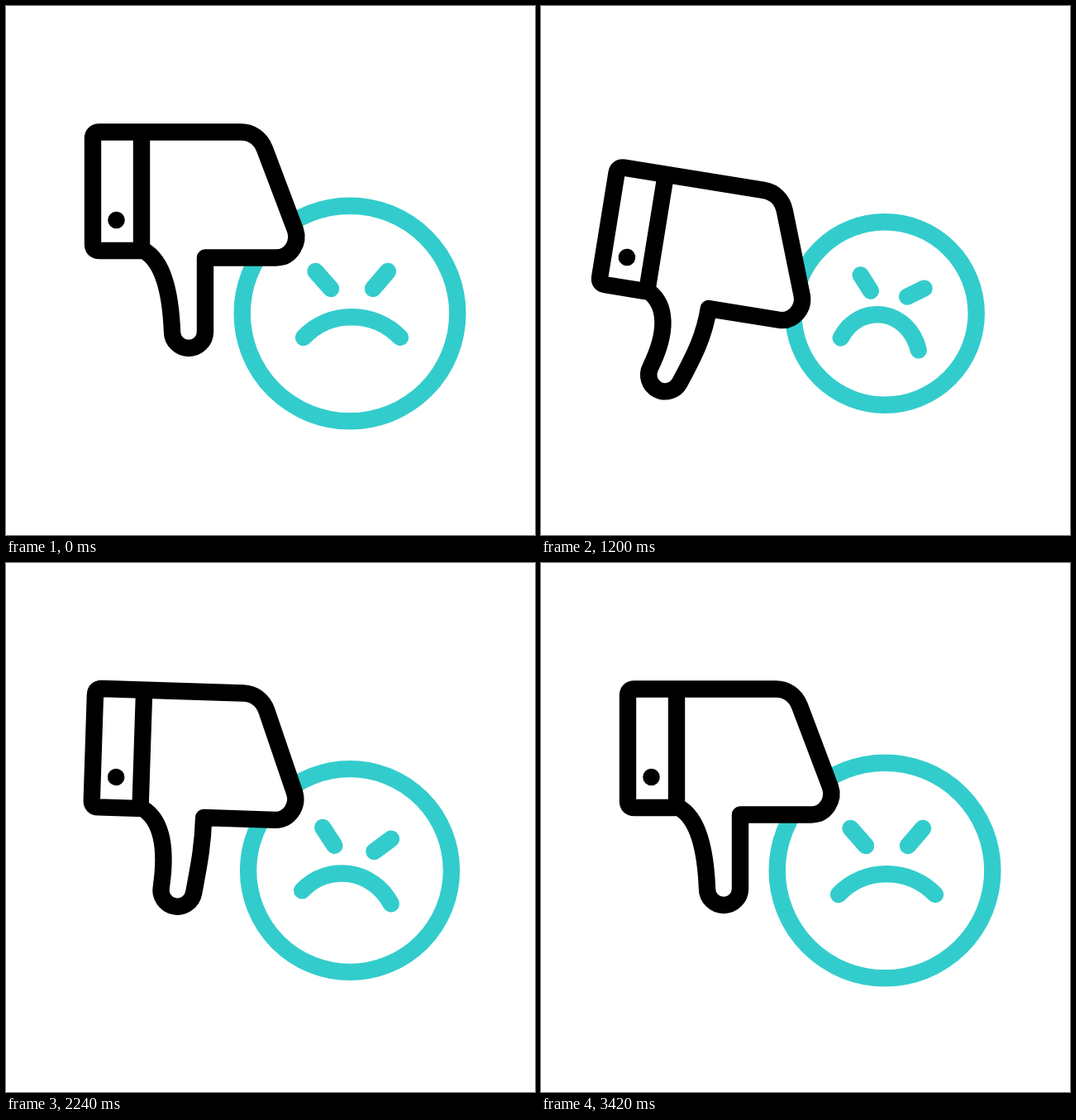
Recreate the animation shown at these times as an HTML page with a canvas. Size 640 by 640 pixels, loop 3.6 s.

```html
<!DOCTYPE html>
<html lang="en">
<head>
<meta charset="utf-8">
<title>Thumbs down</title>
<style>
  html, body { margin: 0; width: 100%; height: 100%; overflow: hidden; background: #fff; }
  canvas { display: block; width: 640px; height: 640px; }
</style>
</head>
<body>
<canvas id="stage" width="640" height="640"></canvas>
<script>
const ctx = document.getElementById('stage').getContext('2d');
const LOOP = 3600, TEAL = '#33cccc', RAD = Math.PI / 180;

// Wind up, swing, fall back, bounce, settle: each motion eases through one extreme per beat.
const beats = [0, 1460, 1860, 2450, 2770, 3250];
const motion = {
  angle: [12.9, -9.6, 6.3, -3],
  lift: [85, -110, 47, -9],
  bend: [-27, 20, -20, 13],
  grow: [-27.6, 33, -23, -1.3],
  roll: [12.6, 13.4, 6.6, -7],
  curl: [1.41, 0.7, 0.15, 0]
};

function poseAt(t) {
  let beat = 0;
  while (beat < 4 && t >= beats[beat + 1]) beat++;
  const u = Math.min(1, (t - beats[beat]) / (beats[beat + 1] - beats[beat]));
  const e = beat === 0 ? u ** 1.75 : (1 - Math.cos(Math.PI * u)) / 2;
  const pose = {};
  for (const name in motion) {
    const from = motion[name][beat - 1] ?? 0, to = motion[name][beat] ?? 0;
    pose[name] = from + (to - from) * e;
  }
  return pose;
}

function disc(x, y, r, color) {
  ctx.fillStyle = color;
  ctx.beginPath();
  ctx.arc(x, y, r, 0, 2 * Math.PI);
  ctx.fill();
}

function cloud(x, y, scale) {
  const lobes = [[-28, 5, 30], [5, -12, 36.5], [27, 20, 30], [-5, 32, 32]];
  ctx.save();
  ctx.translate(x, y);
  ctx.scale(scale, scale);
  for (const [a, b, r] of lobes) disc(a, b, r, '#000');
  for (const [a, b, r] of lobes) disc(a, b, r - 20, '#fff');
  disc(4, 7, 20, '#fff');
  for (const [a, b] of [[-15, -7], [22, 0], [-17, 22], [12, 28]]) disc(a, b, 10, '#000');
  ctx.restore();
}

function clouds(t) {
  const u = (t - 1620) / 530;
  if (u <= 0 || u >= 1) return;
  const p = 1 - (1 - u) ** 2, scale = Math.min(1, (1 - u) * 5);
  cloud(390 - 80 * p, 329 - 250 * p, scale);
  cloud(435 + 140 * p, 252 - 182 * p, scale);
}

function face({ grow, roll, curl }) {
  const a = roll * RAD, scale = 1 + grow * 0.0095;
  const at = (x, y) => [
    408 + scale * (x * Math.cos(a) - y * Math.sin(a)),
    365 + scale * (x * Math.sin(a) + y * Math.cos(a))
  ];
  ctx.strokeStyle = TEAL;
  ctx.fillStyle = '#fff';
  ctx.beginPath();
  ctx.arc(416, 372, 130.3 + grow, 0, 2 * Math.PI);
  ctx.fill();
  ctx.stroke();
  ctx.beginPath();
  ctx.moveTo(...at(-33.5, -44));
  ctx.lineTo(...at(-15, -23));
  ctx.moveTo(...at(54 + 9 * curl, -44 + 5 * curl));
  ctx.lineTo(...at(36 + 4 * curl, -23));
  const side = 36 + 17 * curl, top = 3 - 8 * curl;
  ctx.moveTo(...at(-48, side));
  ctx.bezierCurveTo(...at(-17 - 11 * curl, top), ...at(37 + 8 * curl, top), ...at(69, side));
  ctx.stroke();
}

function hand({ angle, lift, bend }) {
  const drift = lift > 0 ? -31 * (lift / 60.4) ** 1.5 : -0.1 * lift;
  const a = Math.max(0, -bend) * RAD, cx = 221 + bend, cy = 394 - Math.abs(bend) / 10;
  const tip = (x, y) => [cx + x * Math.cos(a) - y * Math.sin(a), cy + x * Math.sin(a) + y * Math.cos(a)];
  ctx.save();
  ctx.translate(230 + drift, 260 + lift);
  ctx.rotate(angle * RAD);
  ctx.translate(-230, -260);
  ctx.strokeStyle = '#000';
  ctx.fillStyle = '#fff';
  ctx.beginPath();
  ctx.moveTo(113, 152.5);
  ctx.lineTo(284, 152.5);
  ctx.bezierCurveTo(297, 152.5, 308, 160, 313, 173);
  ctx.lineTo(350, 271);
  ctx.bezierCurveTo(355, 286, 345, 304.5, 327, 304.5);
  ctx.lineTo(241, 304.5);
  ctx.bezierCurveTo(241 + Math.max(0, bend) * 0.6, 337, ...tip(20, -40), ...tip(20, 0));
  ctx.arc(cx, cy, 20, a, a + Math.PI);
  ctx.bezierCurveTo(...tip(-22 - Math.max(0, bend) * 0.5, -48), 190, 309, 167, 296);
  ctx.lineTo(113, 296);
  ctx.quadraticCurveTo(105, 296, 105, 288);
  ctx.lineTo(105, 160.5);
  ctx.quadraticCurveTo(105, 152.5, 113, 152.5);
  ctx.closePath();
  ctx.fill();
  ctx.stroke();
  ctx.beginPath();
  ctx.moveTo(164, 153);
  ctx.lineTo(164, 295);
  ctx.stroke();
  disc(133.5, 259, 10.3, '#000');
  ctx.restore();
}

function draw(t) {
  const pose = poseAt(t);
  ctx.fillStyle = '#fff';
  ctx.fillRect(0, 0, 640, 640);
  ctx.lineWidth = 20.4;
  ctx.lineCap = ctx.lineJoin = 'round';
  clouds(t);
  face(pose);
  hand(pose);
}

const start = performance.now();
function tick() {
  draw((performance.now() - start) % LOOP);
  requestAnimationFrame(tick);
}
tick();
</script>
</body>
</html>
```
